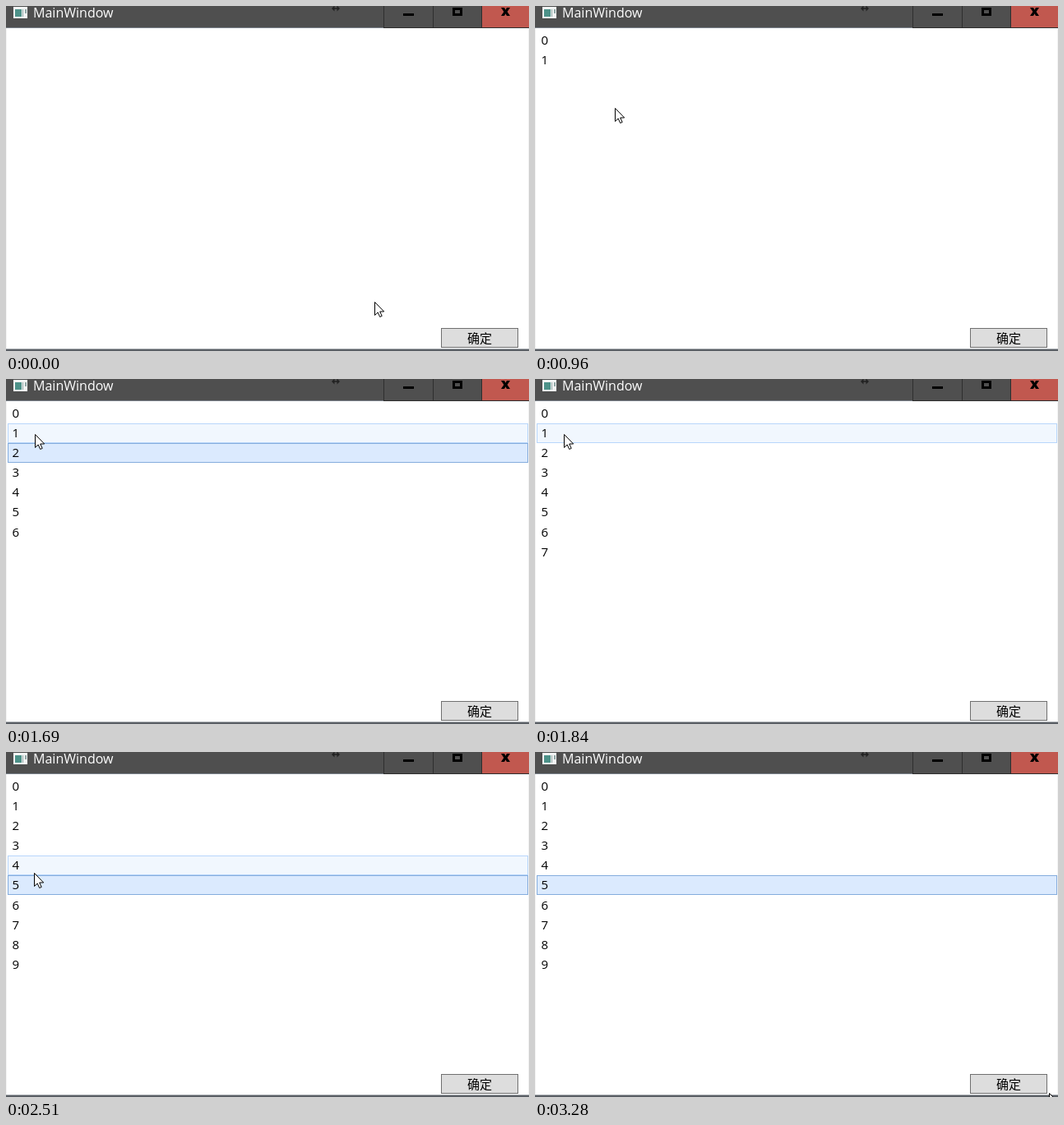
Recreate the animation shown at these times as an HTML page. Size 636 by 420 pixels, loop 3320 ms.

```html
<!DOCTYPE html>
<html lang="zh-CN">
<head>
<meta charset="utf-8">
<title>MainWindow</title>
<style>
  html, body { margin: 0; width: 100%; height: 100%; overflow: hidden; background: #fff; }
  .stage { position: relative; width: 636px; height: 420px; overflow: hidden; background: #fff; }
  .stage > * { position: absolute; box-sizing: border-box; }

  .frame { left: 0; top: 0; }
  .title {
    left: 33px; top: -3px; color: #fff;
    font: 16px/22px "Open Sans", "Noto Sans", sans-serif;
  }

  .list {
    left: 0; top: 30px; width: 636px; height: 0; margin: 0; padding: 0;
    overflow: hidden; list-style: none; color: #000;
    font: 15px/22px "Open Sans", "Noto Sans", sans-serif;
  }
  .list li { height: 24px; padding-left: 7.5px; }
  .list li:nth-child(7) { margin-top: 1px; }

  .bar { left: 2px; top: -99px; width: 633px; height: 24px; border: 1px solid; }
  .hover { background: #f1f7fe; border-color: #b8d6fb; }
  .selected { background: #dbeafe; border-color: #84acdd; }

  .ok {
    left: 529px; top: 392px; width: 94px; height: 24px;
    background: #ddd; border: 1px solid #707070; color: #000; text-align: center;
    font: 15px/22px "Noto Sans CJK SC", "Noto Sans CJK", sans-serif;
  }
  .cursor { left: 0; top: 0; overflow: visible; }

  /* One shared 3.32 s clock; every change is a hard step. */
  .list, .bar, .ok, .cursor { animation: 3320ms step-end infinite; }
  .list { animation-name: fill; }
  .hover { animation-name: hover; }
  .selected { animation-name: select; }
  .ok { animation-name: press; }
  .cursor { animation-name: point; }

  @keyframes fill {
    0% { height: 0; }
    19.57% { height: 24px; }
    24.39% { height: 48px; }
    30.42% { height: 72px; }
    35.24% { height: 96px; }
    40.06% { height: 120px; }
    45.18% { height: 144px; }
    50.9% { height: 169px; }
    55.42% { height: 193px; }
    59.63% { height: 217px; }
    63.85% { height: 241px; }
  }
  @keyframes hover {
    0% { top: -99px; }
    32.83% { top: 78px; }
    50.9% { top: 54px; }
    59.63% { top: 78px; }
    63.85% { top: 150px; }
    75.6% { top: 126px; }
    80.42% { top: 175px; }
    82.53% { top: 223px; }
    84.33% { top: -99px; }
  }
  @keyframes select {
    0% { top: -99px; }
    40.06% { top: 78px; }
    55.42% { top: 54px; }
    66.86% { top: 150px; }
  }
  @keyframes press {
    0% { background: #ddd; border-color: #707070; }
    8.43% { background: #bee6fd; border-color: #3c7fb1; }
    12.95% { background: #c4e5f6; border-color: #2c628b; }
    14.75% { background: #bee6fd; border-color: #3c7fb1; }
    22.28% { background: #ddd; border-color: #707070; }
  }
  @keyframes point {
    0% { transform: translate(448px, 360px); }
    1.8% { transform: translate(460px, 366px); }
    3.91% { transform: translate(485px, 379px); }
    6.32% { transform: translate(515px, 392px); }
    8.43% { transform: translate(537px, 400px); }
    10.84% { transform: translate(548px, 403px); }
    22.28% { transform: translate(470px, 345px); }
    24.39% { transform: translate(330px, 255px); }
    26.5% { transform: translate(190px, 175px); }
    28.91% { transform: translate(97px, 124px); }
    30.42% { transform: translate(60px, 108px); }
    32.83% { transform: translate(45px, 98px); }
    35.24% { transform: translate(40px, 94px); }
    37.65% { transform: translate(37px, 91px); }
    47.89% { transform: translate(36px, 82px); }
    50.9% { transform: translate(35px, 67px); }
    59.63% { transform: translate(35px, 96px); }
    63.85% { transform: translate(34px, 152px); }
    75.6% { transform: translate(34px, 147px); }
    80.42% { transform: translate(120px, 180px); }
    82.53% { transform: translate(300px, 235px); }
    84.33% { transform: translate(540px, 318px); }
    86.44% { transform: translate(700px, 380px); }
    98.79% { transform: translate(625px, 415px); }
  }
</style>
</head>
<body>
<div class="stage">
  <svg class="frame" width="636" height="420" shape-rendering="crispEdges">
    <path fill="#f3f3f3" d="M0 27h1v390h-1zM635 27h1v390h-1z"/>
    <path fill="#4f4f4f" d="M0 0h636v26H0z"/>
    <path fill="#7b838c" d="M0 26h459v1H0z"/>
    <path fill="#c1584f" d="M579 0h57v26h-57z"/>
    <path fill="#2e2e2e" d="M459 0h1v27h-1zM519 0h1v27h-1zM578 0h1v27h-1zM459 26h177v1H459z"/>
    <path fill="#a9adb2" d="M0 417h636v1H0z"/>
    <path fill="#595e64" d="M0 418h636v2H0z"/>
    <!-- window icon -->
    <path fill="#f2f4f4" d="M9 1h17v14H9z"/>
    <path fill="#4d9289" d="M11 4h8v9h-8z"/>
    <path fill="#8fa6a5" d="M20 4h1v9h-1zM23 4h2v5h-2z"/>
    <!-- caption buttons -->
    <path d="M483 9h13v3h-13z"/>
    <path fill-rule="evenodd" d="M543 2h12v10h-12zM546 5v4h6V5z"/>
    <g shape-rendering="auto">
      <path d="M602 2h4l1.500 2.700L609 2h4l-3.400 5 3.400 5h-4l-1.500-2.700L606 12h-4l3.400-5z"/>
      <path fill="#222" d="M396 3l3.500-3.500v2.700h3v-2.700L406 3l-3.500 3.500V3.800h-3v2.700z"/>
    </g>
  </svg>
  <div class="title">MainWindow</div>

  <div class="bar selected"></div>
  <div class="bar hover"></div>
  <ul class="list">
    <li>0</li><li>1</li><li>2</li><li>3</li><li>4</li>
    <li>5</li><li>6</li><li>7</li><li>8</li><li>9</li>
  </ul>

  <div class="ok">确定</div>
  <svg class="cursor" width="13" height="20">
    <path fill="#fff" stroke="#000" d="M.5.5v16l3.700-3.500 2.500 5.500 2.500-1.100-2.500-5.400h5z"/>
  </svg>
</div>
</body>
</html>
```
